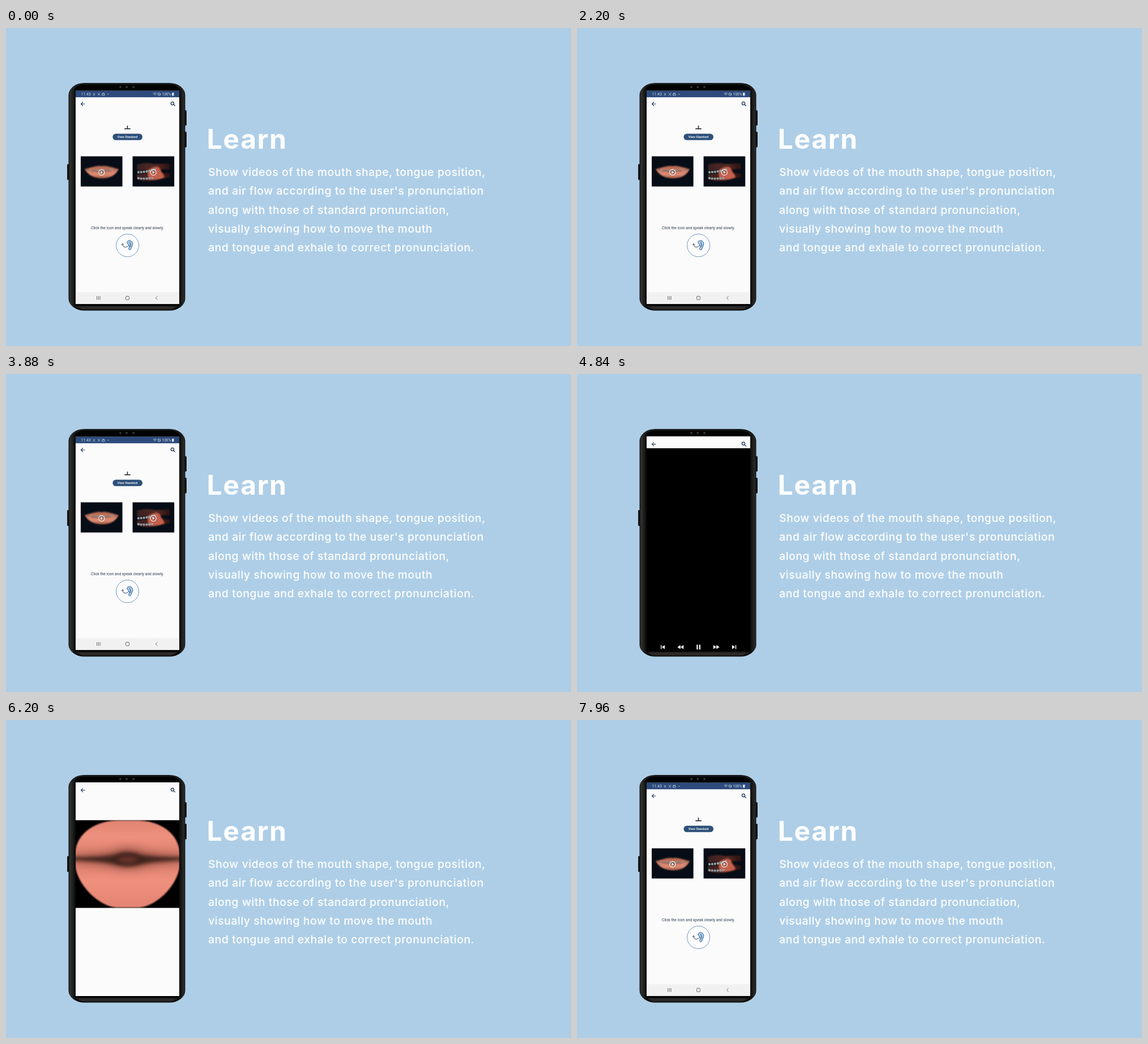
Animation of 998 by 561 pixels, one loop 8 s. Source, as an HTML page:

```html
<!DOCTYPE html>
<html lang="en">
<head>
<meta charset="utf-8">
<title>Learn</title>
<style>
  html, body { margin: 0; width: 100%; height: 100%; overflow: hidden; background: #aecee7; }
  svg { display: block; width: 100vw; height: 100vh; }
  text { font-family: Roboto, sans-serif; }
  .copy text { font-family: Inter, sans-serif; font-optical-sizing: none; fill: #fff; }
  .title { font-size: 48px; font-weight: 700; letter-spacing: 1.6px; }
  .body { font-size: 19.25px; font-weight: 500; letter-spacing: .61px; }
  .line { fill: none; stroke-linecap: round; stroke-linejoin: round; }
  .tap { fill: #fff; fill-opacity: .45; stroke: #9aa4ae; stroke-width: .7; opacity: 0; }
  #player, #video, #loading, #panel { opacity: 0; }
</style>
</head>
<body>
<svg viewBox="0 0 998 561">
  <defs>
    <linearGradient id="shell">
      <stop offset="0" stop-color="#0c0c0c"/>
      <stop offset=".012" stop-color="#32322f"/>
      <stop offset=".035" stop-color="#20201f"/>
      <stop offset=".065" stop-color="#050505"/>
      <stop offset=".94" stop-color="#050505"/>
      <stop offset=".97" stop-color="#1c1c1b"/>
      <stop offset=".988" stop-color="#2a2a28"/>
      <stop offset="1" stop-color="#0c0c0c"/>
    </linearGradient>
    <linearGradient id="lipTone" x2="0" y2="1">
      <stop offset="0" stop-color="#e18371"/>
      <stop offset=".18" stop-color="#ee917e"/>
      <stop offset=".36" stop-color="#e08472"/>
      <stop offset=".54" stop-color="#e08472"/>
      <stop offset=".7" stop-color="#f0917e"/>
      <stop offset="1" stop-color="#e28472"/>
    </linearGradient>
    <linearGradient id="thumbLip" x2="0" y2="1">
      <stop offset="0" stop-color="#a85e49"/>
      <stop offset=".4" stop-color="#d18069"/>
      <stop offset=".7" stop-color="#dd8b73"/>
      <stop offset="1" stop-color="#a15541"/>
    </linearGradient>
    <linearGradient id="jaw">
      <stop offset="0" stop-color="#3a211f"/>
      <stop offset=".6" stop-color="#552a25"/>
      <stop offset="1" stop-color="#29100f"/>
    </linearGradient>
    <filter id="soft1"><feGaussianBlur stdDeviation=".9"/></filter>
    <filter id="soft4" x="-20%" y="-80%" width="140%" height="260%"><feGaussianBlur stdDeviation="3.4"/></filter>
    <filter id="soft9" x="-20%" y="-100%" width="140%" height="300%"><feGaussianBlur stdDeviation="8"/></filter>
    <clipPath id="screen"><rect x="123" y="110.8" width="183" height="376"/></clipPath>
    <clipPath id="frame"><rect x="123" y="176.7" width="183" height="154.7"/></clipPath>

    <g id="topIcons" class="line" stroke="#29446b" stroke-width="1.2">
      <path d="M139 0H132.6M135.5 -3L132.5 0L135.5 3"/>
      <g stroke="#182d50"><circle cx="294" cy="-1" r="2.6"/><path d="M296 1L298.4 3.4"/></g>
    </g>
    <g id="play">
      <circle r="5" fill="#0003" stroke="#fff" stroke-width="1.1"/>
      <path d="M-1.5 -2.6L2.6 0L-1.5 2.6Z" fill="#fff"/>
    </g>
    <path id="prev" d="M147.9 -3.6h1.4V3.6h-1.4ZM155 -3.6V3.6L149.8 0Z"/>
    <path id="rewind" d="M182.7 -3.5V3.5L177.3 0ZM188.2 -3.5V3.5L182.8 0Z"/>
    <path id="forward" d="M240.8 -3.5V3.5L246.2 0ZM246.3 -3.5V3.5L251.7 0Z"/>
    <path id="next" d="M274 -3.6V3.6L279.2 0ZM279.8 -3.6h1.4V3.6h-1.4Z"/>
  </defs>

  <rect width="998" height="561" fill="#aecee7"/>

  <g class="copy">
    <text class="title" x="354.8" y="212.8">Learn</text>
    <g id="copy"></g>
  </g>

  <g fill="#141414">
    <rect x="108" y="240" width="5" height="28" rx="1.5"/>
    <rect x="314" y="145" width="5" height="27" rx="1.5"/>
    <rect x="314" y="183" width="5" height="27.5" rx="1.5"/>
  </g>
  <rect x="110.5" y="97" width="206" height="401.5" rx="28" ry="21" fill="url(#shell)"/>
  <path class="line" d="M119 106Q126 98.8 139 98.6H288Q301 98.8 308 106" stroke="#2a2a29" stroke-width="1.4"/>
  <path d="M130 101.5H298L306 111H123ZM123 486H306L300 491H129Z" fill="#020202"/>
  <path d="M122 490.5H305L293 496.8H134Z" fill="#2d2c2a" filter="url(#soft1)"/>
  <g fill="#343434"><circle cx="202" cy="104" r="2"/><circle cx="213.3" cy="104" r="2"/><circle cx="225" cy="104" r="2"/></g>

  <g clip-path="url(#screen)">
    <g id="list">
      <rect x="123" y="110" width="183" height="378" fill="#fbfbfb"/>
      <rect x="123" y="110" width="183" height="12.2" fill="#2c4b7c"/>
      <g fill="#d5deeb" font-size="6.5">
        <text x="132.5" y="119.2" letter-spacing=".3">11:43</text>
        <text x="275.5" y="119.2">100%</text>
        <rect x="293" y="114" width="3.6" height="5.4" rx=".5"/>
        <circle cx="180.5" cy="116.8" r=".8"/>
      </g>
      <g class="line" stroke="#c3cfdf" stroke-width=".8">
        <path d="M154 115L157 119M157 115L154 119M162 114.5L166 119M166 114.5L162 119M170 116H174V119H170ZM171 114.5V116M173 114.5V116"/>
        <path d="M260 115.4Q263 113 266 115.4M261.3 117Q263 115.7 264.7 117M263 118.6V118.7"/>
        <circle cx="270.5" cy="116.8" r="2.4"/><path d="M268.8 115.1L272.2 118.5"/>
      </g>
      <use href="#topIcons" y="134"/>
      <path d="M209.2 177.8H219.8M214.5 172.2V177.8" stroke="#161b25" stroke-width="1.5"/>
      <rect x="188.4" y="186.6" width="52.6" height="11.2" rx="5.6" fill="#2c5079"/>
      <text x="214.6" y="194.1" font-size="5.5" font-weight="500" fill="#fff" text-anchor="middle">View Standard</text>

      <rect x="132" y="226.4" width="73.6" height="53.2" fill="#060d16"/>
      <g filter="url(#soft1)">
        <path d="M139 249Q149 246 160 243.6Q166 242.3 169 243.7Q172 242.3 178 243.6Q189 246 199 249Q191 265 170 265.3Q148 265 139 249Z" fill="url(#thumbLip)"/>
        <path d="M141 249.2Q155 250.5 169 250.6Q184 250.5 197 248.8Q185 253.5 169 253.8Q152 253.5 141 249.2Z" fill="#3e2522"/>
        <path d="M147 250.5Q169 253 191 250" class="line" stroke="#c7c2bd" stroke-width="1.2"/>
      </g>
      <use href="#play" x="168.8" y="254.6"/>

      <rect x="223.6" y="226.4" width="73.6" height="53.2" fill="#060d16"/>
      <g filter="url(#soft1)">
        <path d="M231 241Q246 236 262 240L290 239V249L265 250L232 252Z" fill="url(#jaw)"/>
        <path d="M231 258L265 254L290 257V263L272 267Q248 273 231 267Z" fill="url(#jaw)"/>
        <path d="M250 252Q264 241 271 247L280 263Q268 269 252 267Z" fill="#c5604e"/>
      </g>
      <g class="line" stroke="#959da1" stroke-width="4.3" stroke-dasharray="0 4.9">
        <path d="M234 254.5Q250 254 266 248.5"/><path d="M234 265Q246 267 262 264"/>
      </g>
      <use href="#play" x="260.3" y="254.6"/>

      <text x="214.5" y="354.7" font-size="6.75" fill="#2d3c52" text-anchor="middle">Click the icon and speak clearly and slowly.</text>
      <circle cx="214.6" cy="383.5" r="20" fill="#fdfdfe" stroke="#6089b5" stroke-width=".9"/>
      <path d="M213.5 378Q215.5 373.8 220 375.2Q225 377.5 223.5 383L220 391Q217.5 392.5 216.2 389.5Q219 386 217.2 383.2Q214.8 381.5 213.5 378Z" fill="#a5cae9" stroke="#315a88" stroke-width=".9"/>
      <path class="line" d="M218.5 378Q221 381 219.5 386M205.8 381Q206 387 211.5 386.6Q215 386 216.8 383.5M204.5 382.7L205.8 380.4L207.8 382" stroke="#29466e" stroke-width="1"/>

      <rect x="123" y="466" width="183" height="22" fill="#f1f1f1"/>
      <g class="line" stroke="#5d5d5d" stroke-width=".9">
        <path d="M160.6 473.4V479.2M163.3 473.4V479.2M166 473.4V479.2M267.3 473.4L264.3 476.3L267.3 479.2"/>
        <rect x="211.5" y="473.3" width="6" height="6" rx="1.5"/>
      </g>
    </g>
    <circle id="tapThumb" class="tap" cx="169" cy="255" r="5"/>

    <g id="player">
      <rect x="123" y="110" width="183" height="378"/>
      <rect x="123" y="110" width="183" height="21" fill="#fbfbfb"/>
      <g id="loading" fill="#fff" transform="translate(0 481.7)">
        <use href="#prev"/><use href="#rewind"/><use href="#forward"/><use href="#next"/>
        <path d="M211.3 -4.2h2.2V4.2h-2.2ZM215.7 -4.2h2.2V4.2h-2.2Z"/>
      </g>
      <g id="video">
        <rect x="123" y="130" width="183" height="358" fill="#fbfbfb"/>
        <g clip-path="url(#frame)">
          <rect x="123" y="176" width="183" height="156" fill="#000"/>
          <g filter="url(#soft1)">
            <path d="M122 236C124 198 160 177 200 177H230C270 177 305 198 307 236V256C303 295 262 331 232 331H198C168 331 127 295 122 256Z" fill="url(#lipTone)"/>
          </g>
          <g id="mouth">
            <path d="M113 240Q170 237 191 231Q214 221 239 231Q262 237 316 240V250Q262 253 240 259Q214 266 190 259Q168 253 113 250Z" fill="#5a2b23" opacity=".55" filter="url(#soft9)"/>
            <path d="M116 241.5Q172 242 192 237.5Q214 228 238 237.5Q258 242 313 241.5V248Q260 249 238 255Q214 262 192 255Q170 249 116 248Z" fill="#331b16" opacity=".86" filter="url(#soft4)"/>
            <ellipse cx="215" cy="246.5" rx="17" ry="6" fill="#74392e" opacity=".7" filter="url(#soft4)"/>
          </g>
        </g>
        <g id="panel" fill="#fff">
          <rect x="123" y="293" width="183" height="38.4" fill="#0f090d" fill-opacity=".86"/>
          <g transform="translate(0 306)">
            <use href="#prev"/><use href="#rewind"/><use href="#forward"/><use href="#next" opacity=".4"/>
            <path d="M212 -4.2V4.2L218.6 0Z"/>
          </g>
          <rect x="148" y="324.1" width="133" height="1.9" rx=".9"/>
          <circle cx="281.3" cy="325" r="2.6"/>
          <g font-size="6.5" font-weight="700">
            <text x="124.6" y="327.3">00:01</text>
            <text x="286.4" y="327.3">00:01</text>
          </g>
        </g>
      </g>
      <use href="#topIcons" y="123.8"/>
      <circle id="tapBack" class="tap" cx="138" cy="124.7" r="5"/>
    </g>
  </g>
</svg>
<script>
  const LOOP = 8000;
  const lines = [
    "Show videos of the mouth shape, tongue position,",
    "and air flow according to the user's pronunciation",
    "along with those of standard pronunciation,",
    "visually showing how to move the mouth",
    "and tongue and exhale to correct pronunciation."
  ];
  lines.forEach((line, i) => {
    const text = document.createElementNS("http://www.w3.org/2000/svg", "text");
    text.setAttribute("class", "body");
    text.setAttribute("x", 357.2);
    text.setAttribute("y", 261 + i * 33.25);
    text.textContent = line;
    document.getElementById("copy").append(text);
  });

  // Each track lists [time in ms, value]; it holds its ends through the loop.
  const tracks = {
    tapThumb: [[3960, 0], [4000, 1], [4120, 1], [4200, 0]],
    player: [[4160, 0], [4320, 1], [7560, 1], [7720, 0]],
    loading: [[4639, 0], [4640, 1], [4919, 1], [4920, 0]],
    video: [[4919, 0], [4920, 1], [7719, 1], [7720, 0]],
    panel: [[6799, 0], [6800, 1], [7719, 1], [7720, 0]],
    tapBack: [[7340, 0], [7380, 1], [7480, 1], [7560, 0]]
  };
  const mouthHeights = [[4920, .8], [5320, .9], [5720, 1.12], [6120, 1]];

  function animate(id, track, toFrame) {
    const full = [[0, track[0][1]], ...track, [LOOP, track.at(-1)[1]]];
    const frames = full.map(([time, value]) => ({ offset: time / LOOP, ...toFrame(value) }));
    document.getElementById(id).animate(frames, { duration: LOOP, iterations: Infinity });
  }

  for (const id in tracks) animate(id, tracks[id], opacity => ({ opacity }));
  document.getElementById("mouth").style.transformOrigin = "214.5px 245px";
  animate("mouth", mouthHeights, scale => ({ transform: `scaleY(${scale})` }));
</script>
</body>
</html>
```
